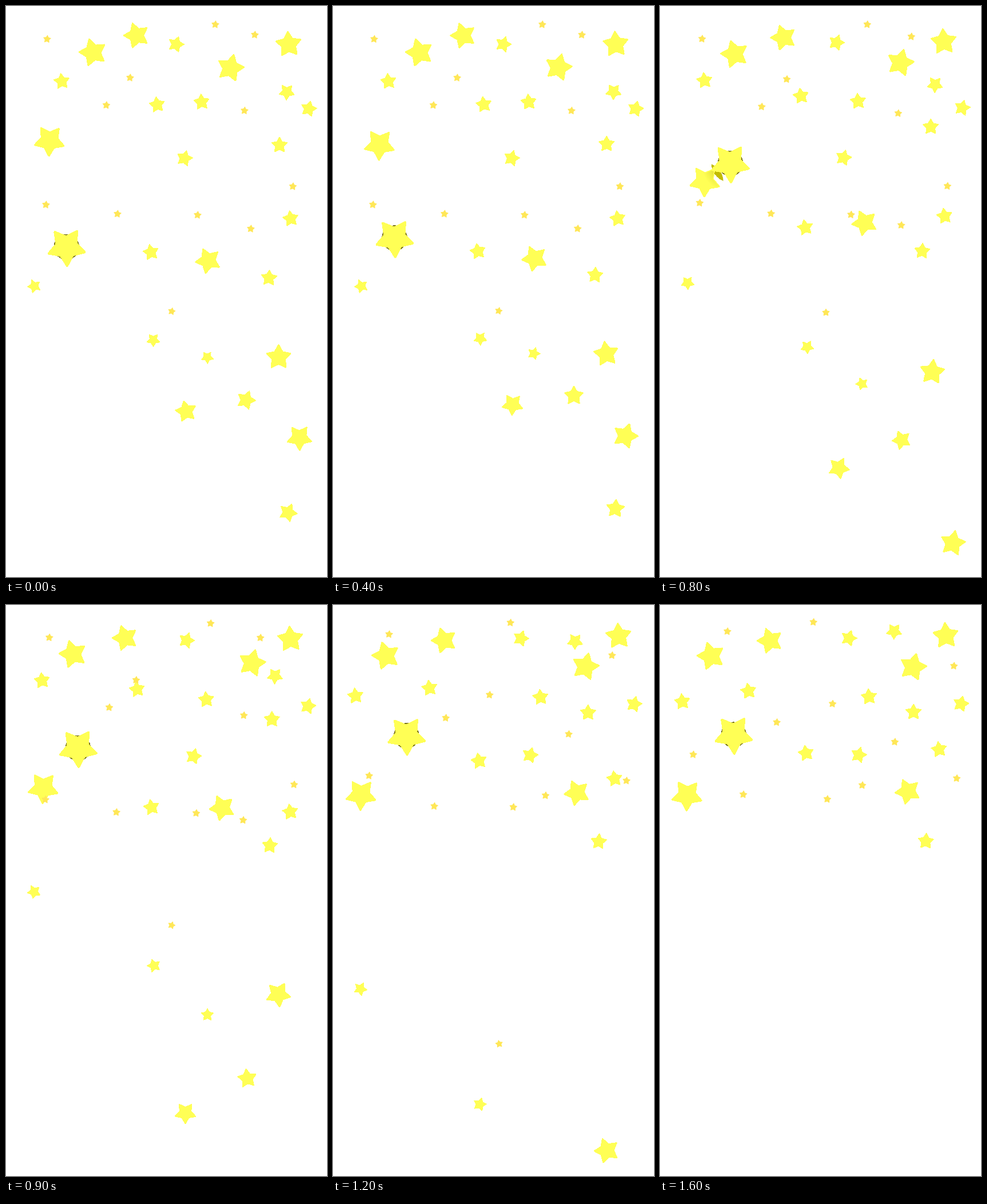
Write an HTML page that moves like this. It is 561 px wide and 998 px high and loops after 1.65 s.

```html
<!DOCTYPE html>
<html lang="en">
<head>
<meta charset="utf-8">
<title>Falling stars</title>
<style>
html, body { margin: 0; width: 100%; height: 100%; overflow: hidden; background: #fff; }
svg { display: block; width: 100vw; height: 100vh; }
</style>
</head>
<body>
<svg id="stage" viewBox="0 0 561 998" shape-rendering="crispEdges">
  <defs>
    <radialGradient id="shade">
      <stop offset="0.4" stop-color="#b0aa00" stop-opacity="0.5"/>
      <stop offset="1" stop-color="#b0aa00" stop-opacity="0"/>
    </radialGradient>
  </defs>
</svg>
<script>
const LOOP = 1650, STEP = 50;
const FIRST_MID = 674, RATE = 0.0088;
const YELLOW = '#ffff55', GOLD = '#ffe757', OLIVE = '#c2bb00', RIM = '#7d771c';
const svg = document.getElementById('stage');
const defs = svg.querySelector('defs');

const sigmoid = v => 1 / (1 + Math.exp(-v));

// Eased move along a slightly bent line; each wave leaves one step later
function drift(wave, r, tilt, [x, y], [dx, dy], [bx, by] = [0, 0]) {
  const mid = FIRST_MID + wave * STEP;
  return t => {
    const p = sigmoid((t - mid) * RATE), arc = 2 * p * (1 - p);
    return { x: x + dx * p + bx * arc, y: y + dy * p + by * arc, r, tilt };
  };
}

// A small lift, then a fall that reaches a steady speed
function dropY(u) {
  const curve = v => 6.3 * v ** 3 - 13.85 * v ** 2;
  return u < 4.2 ? curve(u) : curve(4.2) + 217 * (u - 4.2);
}

function dropTurn(u) {
  const s = Math.min(1, Math.max(0, (u - 0.3) / 1.1));
  return -22 * s * s * (3 - 2 * s) + 75 * sigmoid(2.6 * (u - 2.95));
}

function fall(order, r, tilt, [x, y]) {
  return t => {
    const u = Math.max(0, (t - order * STEP) / 200);
    return { x, y: y + dropY(u), r, tilt: tilt + (u ? dropTurn(u) : 0) };
  };
}

// Outline whose bounding box is centred on x, y
function outline({ x, y, r, tilt }) {
  const pts = Array.from({ length: 10 }, (_, i) => {
    const a = (tilt + i * 36) * Math.PI / 180;
    const d = r * (i % 2 ? 0.51 : 0.94);
    return [d * Math.sin(a), -d * Math.cos(a)];
  });
  const middle = k => {
    const v = pts.map(p => p[k]);
    return (Math.min(...v) + Math.max(...v)) / 2;
  };
  const cx = x - middle(0), cy = y - middle(1);
  const d = 'M' + pts.map(p => (cx + p[0]).toFixed(2) + ' ' + (cy + p[1]).toFixed(2)).join('L') + 'Z';
  return { cx, cy, d };
}

function add(parent, tag, attrs = {}) {
  const el = document.createElementNS('http://www.w3.org/2000/svg', tag);
  for (const key in attrs) el.setAttribute(key, attrs[key]);
  return parent.appendChild(el);
}

function setCircle(el, { cx, cy, r }, scale) {
  el.setAttribute('cx', cx);
  el.setAttribute('cy', cy);
  el.setAttribute('r', r * scale);
}

const stars = [], shades = [];

function addStar(pose, color = YELLOW, rim = false) {
  const disc = rim && add(svg, 'circle', { fill: RIM });
  const path = add(svg, 'path', {
    fill: color, stroke: color, 'stroke-width': pose(0).r * 0.12, 'stroke-linejoin': 'round'
  });
  const star = { pose, path, disc };
  stars.push(star);
  return star;
}

// Shade on a star, and in the gap beside it, from one that passes above
function addShade(low) {
  const id = 'clip' + shades.length;
  const starClip = add(add(defs, 'clipPath', { id: id + 's' }), 'path');
  const discClip = add(add(defs, 'clipPath', { id: id + 'd' }), 'circle');
  const lens = add(svg, 'circle', { fill: OLIVE, 'clip-path': `url(#${id}d)` });
  svg.insertBefore(lens, low.path);
  const glow = add(svg, 'circle', { fill: 'url(#shade)', 'clip-path': `url(#${id}s)` });
  const shade = { low, starClip, discClip, lens, glow };
  shades.push(shade);
  return shade;
}

const large = (...args) => addStar(drift(...args));
const small = (wave, ...rest) => addStar(drift(wave, 14.6, ...rest));
const dot = (wave, from, shift) => addStar(drift(wave, 7.2, 6, from, shift), GOLD);

const left = large(0.4, 28, 38, [75.5, 237.5], [-28.5, 97.5], [57, 3]);
const leftShade = addShade(left);
const right = large(2, 24.8, 14, [394, 108], [50, 0], [0, -19]);
const rightShade = addShade(right);
large(3, 23.3, -24, [352, 446], [80, -119.5], [-64, -26]);
large(4, 25.3, -16, [150, 81], [-63, 8]);
large(4, 23.3, -18, [226, 51.5], [-36, 11]);
large(4, 23.5, -4, [493.5, 65.5], [5.5, -13.5]);
leftShade.top = addStar(drift(0, 35, 34, [106, 424.5], [23, -195]), YELLOW, true);

small(0, 4, [460, 474.5], [5, -62.5], [-14, 0]);
small(3, 0, [478, 242], [-35, -56], [22, -14]);
small(4, 18, [298.5, 67], [33, -9]);
small(5, 14, [530, 179.5], [-3, -7]);
small(5, 15, [313, 266], [35.5, -4]);
small(5, -10, [252.5, 430], [2, -172]);
small(6, -6, [97, 131], [-58.5, 37.5], [-32, -28]);
small(6, -8, [263.5, 172], [-110, -22], [6, -39]);
small(6, -5, [341.5, 167], [23.5, -7.5]);
rightShade.top = small(7, 38, [490.5, 151.5], [-82, -105]);
small(10, -8, [497, 371], [-10, -122]);

dot(8, [175.5, 173], [29, 32]);
dot(8, [417, 182.5], [-6.5, 57]);
dot(8, [428, 389], [-75, -75]);
dot(9, [217, 125], [86, 48]);
dot(9, [435, 50], [80, 57]);
dot(9, [501.5, 315], [17.5, -12.5]);
dot(10, [72, 57.5], [47, -12]);
dot(10, [366, 32], [-100, -2.5]);
dot(10, [70, 347], [-12, -88]);
dot(11, [335, 365], [-44, -27]);
dot(12, [195, 363], [-52, -34]);

// Lower stars drop one after another, in this order
[
  [23, 35, [513, 756.5]],
  [16.8, 24, [494, 886]],
  [19.4, -12, [313.5, 708]],
  [17.4, 20, [421, 689]],
  [11.5, 34, [352, 615]],
  [22.7, 0, [476.5, 612]],
  [12.3, 36, [257.5, 585]],
  [7, 12, [290, 533.5]],
  [12.3, -22, [48.5, 490]]
].forEach(([r, tilt, at], i) => addStar(fall(i, r, tilt, at), r < 8 ? GOLD : YELLOW));

function draw(t) {
  for (const s of stars) {
    s.now = s.pose(t);
    Object.assign(s.now, outline(s.now));
    s.path.setAttribute('d', s.now.d);
    if (s.disc) setCircle(s.disc, s.now, 0.64);
  }
  for (const { low, top, starClip, discClip, lens, glow } of shades) {
    starClip.setAttribute('d', low.now.d);
    setCircle(discClip, low.now, 1.15);
    setCircle(lens, top.now, 0.95);
    setCircle(glow, top.now, 1.45);
  }
}

const begin = performance.now();

function tick() {
  const t = (performance.now() - begin) % LOOP;
  draw(Math.floor(t / STEP) * STEP);
  requestAnimationFrame(tick);
}
draw(0);
requestAnimationFrame(tick);
</script>
</body>
</html>
```
